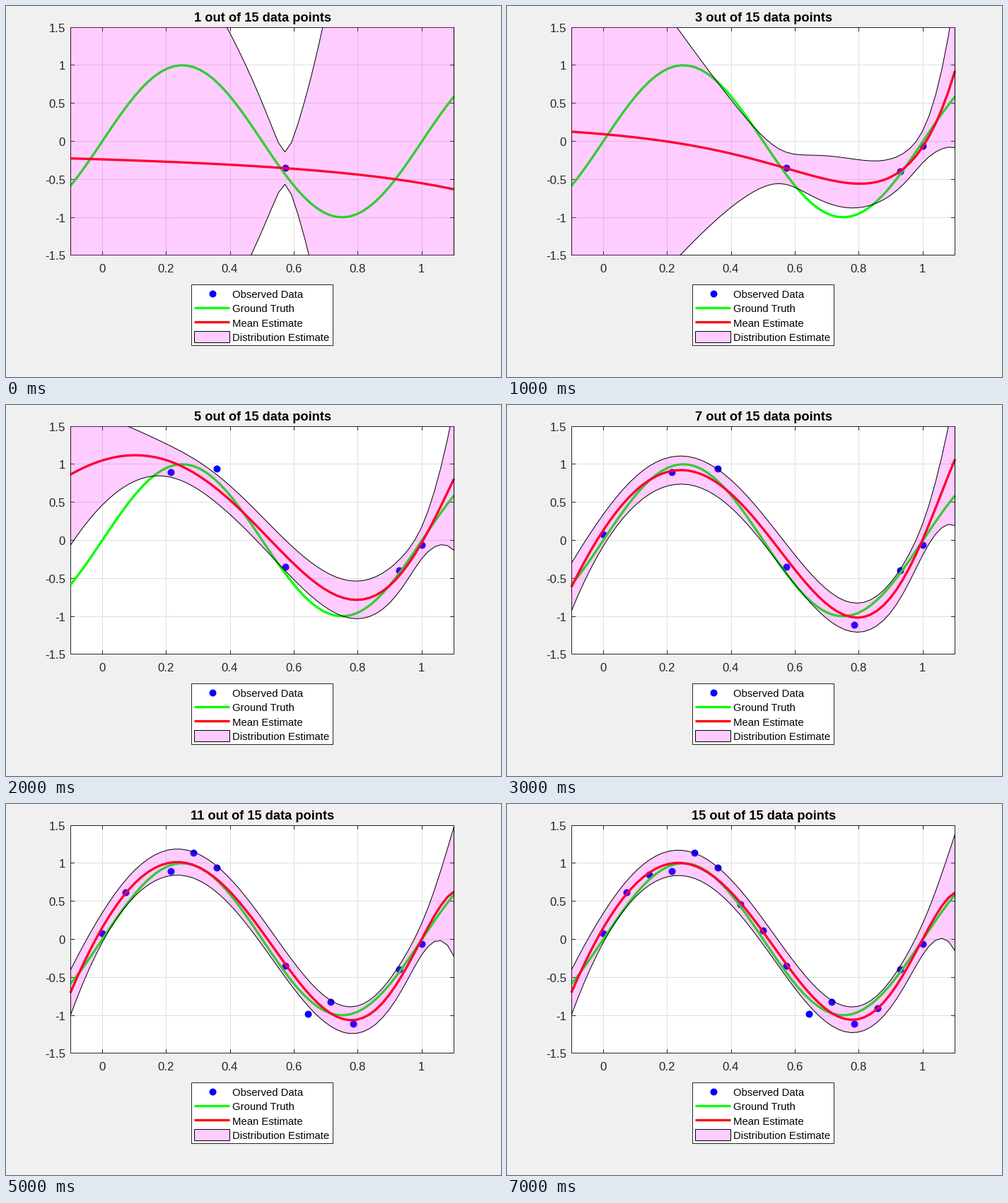
A matplotlib script that plays this animation: 700x525 px, repeating every 7.5 s.

```python
import numpy as np
import matplotlib.pyplot as plt
from matplotlib.animation import FuncAnimation
from matplotlib.patches import Polygon, Rectangle

W, H, DPI = 700, 525, 100
LEFT, RIGHT, TOP, BOTTOM = 91.0, 633.5, 30.0, 352.8
INK = "#262626"

# Bayesian polynomial regression
DEGREE, ALPHA, BETA = 8, 5e-3, 11.1
OBS_X = np.arange(15) / 14
OBS_Y = np.array([0.077, 0.62, 0.845, 0.90, 1.138, 0.94, 0.46, 0.112,
                  -0.354, -0.983, -0.824, -1.11, -0.904, -0.398, -0.065])
ORDER = [8, 13, 14, 3, 5, 0, 11, 10, 9, 1, 4, 6, 12, 2, 7]
GRID = np.linspace(-0.1, 1.1, 60)

plt.rcParams["font.family"] = "Liberation Sans"


def pt(px):
    return px * 72 / DPI


def sx(x):
    return LEFT + (np.asarray(x) + 0.1) / 1.2 * (RIGHT - LEFT)


def sy(y):
    return TOP + (1.5 - np.asarray(y)) / 3 * (BOTTOM - TOP)


def mid(v):
    """Centre of the pixel that holds v."""
    return np.floor(v + 1e-6) + 0.5


def basis(x):
    return x[:, None] ** np.arange(DEGREE + 1)


def fit(idx):
    """Posterior mean and half a predictive standard deviation on GRID."""
    phi, out = basis(OBS_X[idx]), basis(GRID)
    cov = np.linalg.inv(ALPHA * np.eye(DEGREE + 1) + BETA * phi.T @ phi)
    mean = out @ (BETA * cov @ phi.T @ OBS_Y[idx])
    var = 1 / BETA + np.sum((out @ cov) * out, axis=1)
    return mean, 0.5 * np.sqrt(var)


fig = plt.figure(figsize=(W / DPI, H / DPI), dpi=DPI, facecolor="#f0f0f0")
ax = fig.add_axes([0, 0, 1, 1])
ax.set_xlim(0, W)
ax.set_ylim(H, 0)
ax.axis("off")


def line(xs, ys, color, width=1.0, z=2.0):
    return ax.plot(xs, ys, color=color, lw=pt(width), zorder=z, snap=False,
                   solid_capstyle="butt")[0]


def dots(xs, ys, z):
    return ax.plot(xs, ys, "o", color="#0000ff", ms=pt(10), mew=0, zorder=z,
                   snap=False)[0]


def box(x0, y0, x1, y1, face, edge, z):
    ax.add_patch(Rectangle((x0, y0), x1 - x0, y1 - y0, fc=face, ec=edge,
                           lw=pt(1), zorder=z, snap=False))


def label(x, y, s, size, ha="center", color=INK, weight="normal"):
    return ax.text(x, y, s, fontsize=pt(size), ha=ha, va="baseline",
                   color=color, weight=weight, zorder=10)


def draw_axes():
    x0, x1, y0, y1 = mid(LEFT), mid(RIGHT), mid(TOP), mid(BOTTOM)
    box(x0, y0, x1, y1, "white", "none", 1)
    for v in np.arange(6) / 5:
        x = mid(sx(v))
        line([x, x], [y0, y1], "#dfdfdf")
        line([x, x], [y1, y1 - 5.5], INK, z=2.2)
        line([x, x], [y0, y0 + 5.5], INK, z=2.2)
        label(sx(v) - 0.5, 377, f"{v:g}", 16.7)
    for v in np.arange(-3, 4) / 2:
        y = mid(sy(v))
        if abs(v) < 1.5:
            line([x0, x1], [y, y], "#dfdfdf")
            line([x0, x0 + 5.5], [y, y], INK, z=2.2)
            line([x1, x1 - 5.5], [y, y], INK, z=2.2)
        label(84, y + 6.5, f"{v:g}", 16.7, ha="right")
    box(x0, y0, x1, y1, "none", INK, 2.3)


def draw_legend():
    box(262.5, 394.5, 462.5, 480.5, "white", INK, 8)
    dots([291.8], [406.5], 9)
    line([266.5, 316.5], [427.5, 427.5], "#00ff00", 3.3, 9)
    line([266.5, 316.5], [447.5, 447.5], "#ff0000", 3.3, 9)
    box(266.5, 460.5, 316.5, 476.5, "#ffccff", "black", 9)
    names = ["Observed Data", "Ground Truth", "Mean Estimate",
             "Distribution Estimate"]
    for name, y in zip(names, (413, 433, 454, 474)):
        label(320, y, name, 14.9, ha="left", color="black")


draw_axes()
draw_legend()

gx = sx(GRID)
points = dots([], [], 3)
truth = line(gx, sy(np.sin(2 * np.pi * GRID)), "#00ff00", 3.3, 4)
mean_line = line([], [], "#ff0000", 3.3, 5)
band = ax.add_patch(Polygon([(0, 0), (1, 0), (1, 1)], closed=True, snap=False,
                            fc=(1, 0, 1, 0.2), ec="black", lw=pt(1), zorder=6))
title = label(363, 22, "", 18.3, color="black", weight="bold")


def clip(artist, spill):
    """Cut at top and bottom, with some room past the sides."""
    top, bottom = np.floor(TOP), np.ceil(BOTTOM)
    left, right = np.floor(LEFT) - spill, np.ceil(RIGHT) + spill
    artist.set_clip_path(Rectangle((left, top), right - left, bottom - top,
                                   transform=ax.transData))


clip(truth, 3)
clip(mean_line, 3)
clip(band, 0)


def update(frame):
    idx = ORDER[:frame + 1]
    mean, half = fit(idx)
    points.set_data(sx(OBS_X[idx]), sy(OBS_Y[idx]))
    mean_line.set_data(gx, sy(mean))
    upper = np.column_stack([gx, sy(mean + half)])
    lower = np.column_stack([gx, sy(mean - half)])
    band.set_xy(np.vstack([upper, lower[::-1]]))
    title.set_text(f"{frame + 1} out of 15 data points")
    return points, mean_line, band, title


anim = FuncAnimation(fig, update, frames=15, interval=500, repeat=True,
                     repeat_delay=0, blit=False)
plt.show()
```
